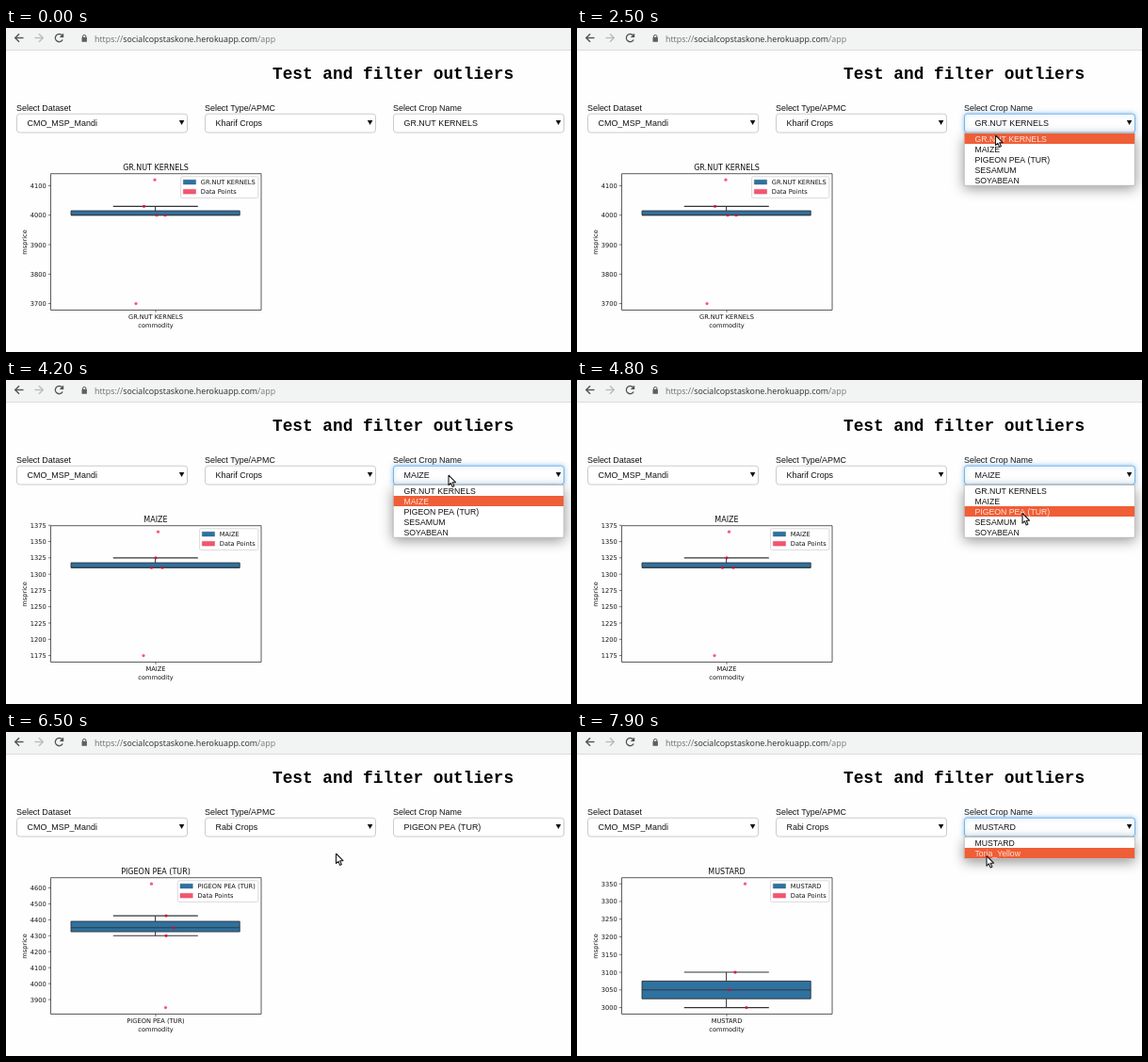
Recreate the animation shown at these times as an HTML page with a canvas. Size 600x344 px, loop 8 s.

```html
<!DOCTYPE html>
<html lang="en">
<head>
<meta charset="utf-8">
<title>Test and filter outliers</title>
<style>
html, body { margin: 0; width: 100%; height: 100%; overflow: hidden; background: #fefefe; }
canvas { display: block; width: 600px; height: 344px; }
</style>
</head>
<body>
<canvas id="stage"></canvas>
<script>
const W = 600, H = 344, LOOP = 8000, STEP = 100;
const canvas = document.getElementById('stage');
const ctx = canvas.getContext('2d');
const ratio = window.devicePixelRatio || 1;
canvas.width = W * ratio;
canvas.height = H * ratio;

const SANS = '"Liberation Sans", Arial, sans-serif';
const MONO = '"Liberation Mono", "Courier New", monospace';
const PLOT = '"DejaVu Sans", sans-serif';
const BAR = '"Open Sans", "Noto Sans", sans-serif';
const BLUE = '#2f719f', PINK = '#f4546f', INK = '#303438';

const KHARIF = ['GR.NUT KERNELS', 'MAIZE', 'PIGEON PEA (TUR)', 'SESAMUM', 'SOYABEAN'];
const RABI = ['MUSTARD', 'Toria_Yellow'];
const TYPES = ['Kharif Crops', 'Rabi Crops'];

// box: low whisker, q1, median, q3, high whisker; points: x, value
const plots = {
  'GR.NUT KERNELS': {
    ticks: [3700, 4100, 100], box: [4000, 4000, 4000, 4015, 4030],
    points: [[158, 4120], [146.5, 4030], [160, 4000], [169, 4000], [138, 3700]]
  },
  'MAIZE': {
    ticks: [1175, 1375, 25], box: [1310, 1310, 1310, 1317.5, 1325],
    points: [[161.5, 1365], [159, 1325], [154.5, 1310], [166, 1310], [146, 1175]]
  },
  'PIGEON PEA (TUR)': {
    ticks: [3900, 4600, 100], box: [4300, 4325, 4350, 4390, 4425],
    points: [[154.5, 4625], [170, 4425], [178, 4350], [170, 4300], [169.5, 3850]]
  },
  'MUSTARD': {
    ticks: [3000, 3350, 50], box: [3000, 3025, 3050, 3075, 3100],
    points: [[178.5, 3350], [168, 3100], [162, 3050], [180, 3000]]
  }
};

// time, value: each holds until the next
const cropAt = [[0, KHARIF[0]], [3100, KHARIF[1]], [5000, KHARIF[2]], [6700, RABI[0]]];
const plotAt = [[0, KHARIF[0]], [3300, KHARIF[1]], [5200, KHARIF[2]], [6900, RABI[0]]];
const typeAt = [[0, TYPES[0]], [6400, TYPES[1]]];
const menuAt = [
  [0, null], [2200, 'crop'], [3100, null], [4000, 'crop'], [5000, null],
  [5700, 'type'], [6400, null], [7400, 'crop']
];

// time, tip x, tip y
const path = [
  [1900, 458, 98], [2200, 450, 101], [2500, 444.5, 114], [2800, 455, 126],
  [3300, 455, 126], [3500, 461, 112], [3800, 470, 99], [4200, 470, 101],
  [4800, 473, 141.5], [5000, 473, 141.5], [5400, 353, 102], [5700, 353, 102],
  [6200, 350.5, 129], [6600, 350.5, 129], [7300, 435, 101], [7500, 435, 102],
  [7800, 435, 131.5]
];

function held(track, t) {
  let value = track[0][1];
  for (const [at, v] of track) if (t >= at) value = v;
  return value;
}

function cursorAt(t) {
  if (t < path[0][0]) return null;
  const i = path.findIndex(p => p[0] > t);
  if (i < 0) return path[path.length - 1].slice(1);
  const [t0, x0, y0] = path[i - 1], [t1, x1, y1] = path[i];
  const k = (t - t0) / (t1 - t0), e = k * k * (3 - 2 * k);
  return [x0 + (x1 - x0) * e, y0 + (y1 - y0) * e];
}

function text(str, x, y, font, color = '#111', align = 'left') {
  ctx.font = font;
  ctx.fillStyle = color;
  ctx.textAlign = align;
  ctx.fillText(str, x, y);
  return ctx.measureText(str).width;
}

function line(points, color, width = 1) {
  ctx.beginPath();
  points.forEach(([x, y]) => ctx.lineTo(x, y));
  ctx.strokeStyle = color;
  ctx.lineWidth = width;
  ctx.stroke();
}

function shape(points, color) {
  ctx.beginPath();
  points.forEach(([x, y]) => ctx.lineTo(x, y));
  ctx.closePath();
  ctx.fillStyle = color;
  ctx.fill();
}

function rect(x, y, w, h, fill, stroke, radius = 0, width = 1) {
  ctx.beginPath();
  ctx.roundRect(x, y, w, h, radius);
  if (fill) {
    ctx.fillStyle = fill;
    ctx.fill();
  }
  if (stroke) {
    ctx.strokeStyle = stroke;
    ctx.lineWidth = width;
    ctx.stroke();
  }
}

function shadow(color, blur, dy = 0) {
  ctx.shadowColor = color;
  ctx.shadowBlur = blur * ratio;
  ctx.shadowOffsetY = dy * ratio;
}

function arrow(x, dir, color) {
  line([[x - 4.5 * dir, 10.5], [x + 4 * dir, 10.5]], color, 1.4);
  line([[x, 6.2], [x + 4.3 * dir, 10.5], [x, 14.8]], color, 1.4);
}

function toolbar() {
  rect(0, 0, W, 23, '#f2f3f3');
  line([[0, 23.5], [W, 23.5]], '#dcdddd');
  arrow(14, -1, '#505356');
  arrow(35, 1, '#b9bbbd');

  ctx.beginPath();
  ctx.arc(56.5, 10.5, 4.1, 0.5, 5.6);
  ctx.strokeStyle = '#505356';
  ctx.lineWidth = 1.4;
  ctx.stroke();
  shape([[61.2, 5.6], [61.2, 10], [56.8, 10]], '#505356');

  rect(80.5, 9.8, 5.4, 5, '#5c5f62', null, 0.6);
  ctx.beginPath();
  ctx.arc(83.2, 9, 1.7, Math.PI, 0);
  ctx.lineTo(84.9, 10);
  ctx.moveTo(81.5, 9);
  ctx.lineTo(81.5, 10);
  ctx.strokeStyle = '#5c5f62';
  ctx.lineWidth = 1;
  ctx.stroke();

  const font = '8.9px ' + BAR;
  let x = 94;
  x += text('https://', x, 14.5, font, '#6b6e70');
  x += text('socialcopstaskone.herokuapp.com', x, 14.5, font, '#2b2d2f');
  text('/app', x, 14.5, font, '#777a7c');
}

function select(x, label, value, open) {
  text(label, x, 87.5, '8.93px ' + SANS);
  if (open) shadow('rgba(102,175,233,0.7)', 5);
  rect(x + 0.5, 91.2, 181, 19.8, '#fff', open ? '#7db4e4' : '#cbcbd0', 3);
  shadow('transparent', 0);
  text(value, x + 11.5, 104, '8.93px ' + SANS);
  shape([[x + 172.8, 98], [x + 178.4, 98], [x + 175.6, 103]], '#111');
}

function menu(x, items, value, cursor) {
  const top = 112, row = 11, h = items.length * row;
  shadow('rgba(0,0,0,0.42)', 13, 4);
  rect(x, top - 0.5, 181.5, h + 0.8, '#fff');
  shadow('transparent', 0);
  rect(x + 0.3, top - 0.5, 181, h + 0.8, '#fff', '#a9a9a9', 0, 0.7);

  const over = Math.floor((cursor[1] - top) / row);
  const active = items[over] ? over : items.indexOf(value);
  items.forEach((item, i) => {
    const y = top + i * row;
    if (i === active) rect(x + 0.6, y, 180.5, row, '#ef5e37');
    text(item, x + 11.5, y + 8.6, '8.7px ' + SANS, i === active ? '#fde4da' : '#111');
  });
}

function legend(name) {
  const font = '6.67px ' + PLOT, rows = [[name, BLUE], ['Data Points', PINK]];
  ctx.font = font;
  const x = 264.8 - Math.max(...rows.map(r => ctx.measureText(r[0]).width));
  rect(x - 21.2, 157.8, 289 - x, 22.6, 'rgba(255,255,255,0.85)', '#d2d2d2', 1.5, 0.8);
  rows.forEach(([label, color], i) => {
    const y = 161.2 + i * 10.1;
    rect(x - 18.5, y, 13.3, 4.8, color, color === BLUE ? '#2b5f85' : '#e04c68', 0, 0.4);
    text(label, x, y + 5, font);
  });
}

function plot(name) {
  const { ticks: [first, last, gap], box, points } = plots[name];
  const values = points.map(p => p[1]);
  const low = Math.min(...values), high = Math.max(...values);
  const toY = v => 292.6 - (v - low) / (high - low) * 131.4;
  const small = '6.67px ' + PLOT, mid = 159;

  text(name, mid, 150.8, '8px ' + PLOT, '#111', 'center');
  for (let v = first; v <= last; v += gap) {
    const y = toY(v);
    line([[45, y], [47.5, y]], INK, 0.7);
    text(v, 42.8, y + 2.5, small, '#111', 'right');
  }
  line([[mid, 299.5], [mid, 302]], INK, 0.7);
  text(name, mid, 309, small, '#111', 'center');
  text('commodity', mid, 318.3, small, '#111', 'center');

  ctx.save();
  ctx.translate(22, 227.5);
  ctx.rotate(-Math.PI / 2);
  text('msprice', 0, 0, small, '#111', 'center');
  ctx.restore();

  const [lo, q1, median, q3, hi] = box.map(toY);
  rect(69, q3, 179.2, q1 - q3, BLUE, INK, 0, 0.9);
  line([[69, median], [248.2, median]], INK, 0.9);
  for (const [from, to] of [[q1, lo], [q3, hi]]) {
    if (from === to) continue;
    line([[158.6, from], [158.6, to]], INK);
    line([[113.8, to], [203.8, to]], INK, 1.1);
  }

  for (const [x, v] of points) {
    const inside = v >= box[0] && v <= box[4];
    ctx.beginPath();
    ctx.arc(x, toY(v), 1.6, 0, 7);
    ctx.fillStyle = inside ? 'rgba(214,10,48,0.85)' : 'rgba(250,45,80,0.8)';
    ctx.fill();
  }
  rect(47.5, 154.7, 223.5, 144.8, null, INK, 0, 0.8);
  legend(name);
}

function pointer([x, y]) {
  ctx.save();
  ctx.translate(x, y);
  ctx.lineJoin = 'round';
  const outline = [
    [0, 0], [0, 10.6], [2.4, 8.4], [4.1, 12.4], [5.9, 11.6], [4.2, 7.8], [7.5, 7.6], [0, 0]
  ];
  shape(outline, '#fff');
  line(outline, '#1a1a1a', 1.1);
  ctx.restore();
}

function draw(t) {
  const crop = held(cropAt, t), type = held(typeAt, t), open = held(menuAt, t);
  const cursor = cursorAt(t);
  ctx.setTransform(ratio, 0, 0, ratio, 0, 0);
  rect(0, 0, W, H, '#fefefe');
  toolbar();
  text('Test and filter outliers', 283, 54.2, 'bold 17.8px ' + MONO, '#000');
  plot(held(plotAt, t));
  select(11, 'Select Dataset', 'CMO_MSP_Mandi', false);
  select(211, 'Select Type/APMC', type, open === 'type');
  select(411, 'Select Crop Name', crop, open === 'crop');
  if (open === 'type') menu(211, TYPES, type, cursor);
  if (open === 'crop') menu(411, type === TYPES[0] ? KHARIF : RABI, crop, cursor);
  if (cursor) pointer(cursor);
}

function tick() {
  const t = performance.now() % LOOP;
  draw(Math.floor(t / STEP) * STEP);
  requestAnimationFrame(tick);
}
tick();
</script>
</body>
</html>
```
